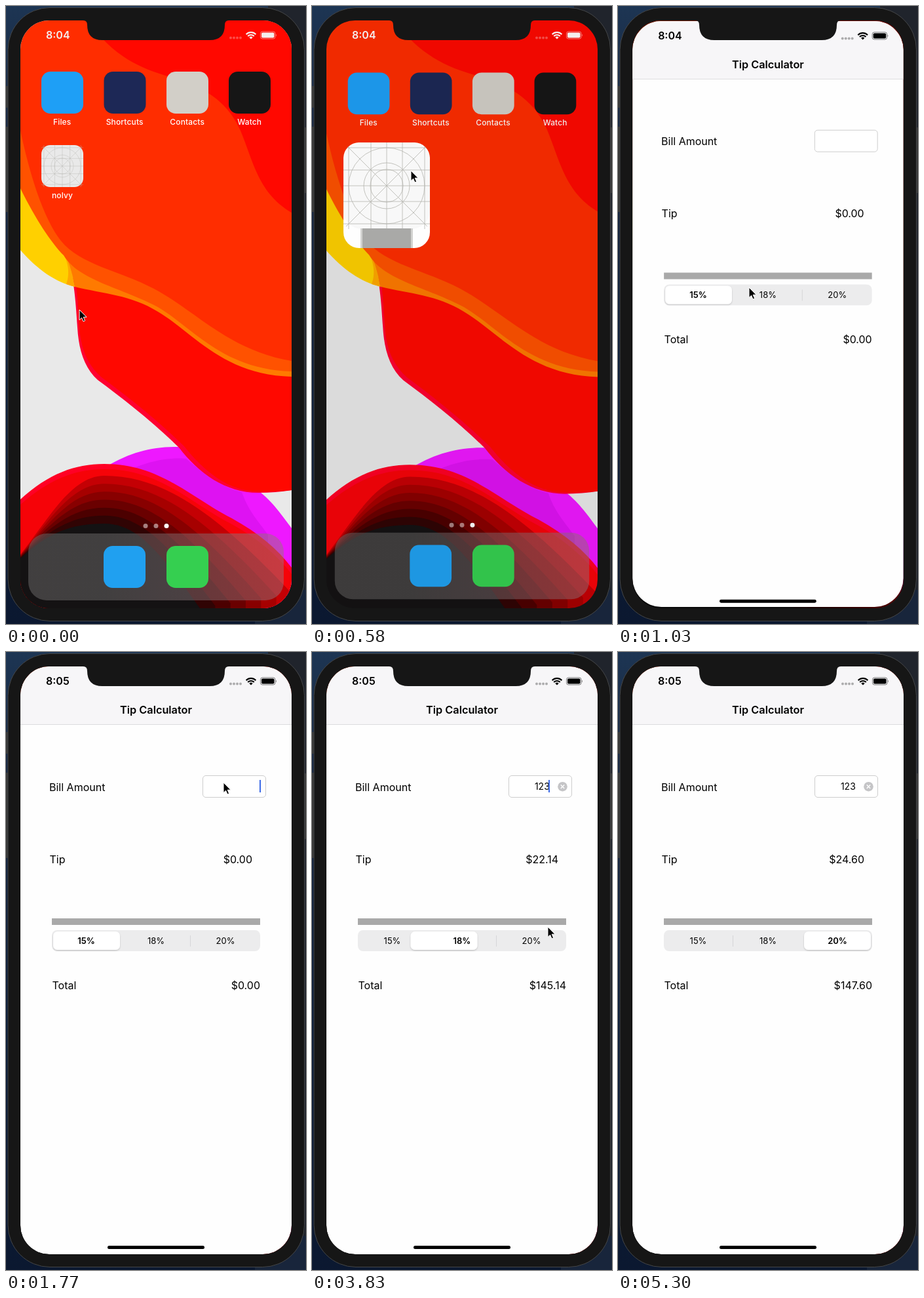
Animation of 458 by 942 pixels, one loop 5400 ms. Source, as an HTML page:

```html
<!DOCTYPE html>
<html lang="en">
<head>
<meta charset="utf-8">
<title>Tip Calculator</title>
<style>
  html, body { margin: 0; width: 100%; height: 100%; overflow: hidden; background: #12161f; }
  svg { display: block; width: 458px; height: 942px; }
  text { font-family: Inter, "Liberation Sans", sans-serif; font-size: 16px; }
  .time { font-weight: 600; }
  .label { font-size: 12px; font-weight: 500; fill: #fff; text-anchor: middle; letter-spacing: .15px; }
  .end { text-anchor: end; }
  .seg { font-size: 13px; text-anchor: middle; }
</style>
</head>
<body>
<svg viewBox="0 0 458 942">
  <defs>
    <linearGradient id="desk" x2="0" y2="1">
      <stop offset="0" stop-color="#1d3553"/>
      <stop offset=".2" stop-color="#17263f"/>
      <stop offset=".6" stop-color="#0c1d38"/>
      <stop offset="1" stop-color="#0b1830"/>
    </linearGradient>
    <linearGradient id="dock">
      <stop offset=".3" stop-color="#6e6c6c"/>
      <stop offset="1" stop-color="#98727a"/>
    </linearGradient>
    <clipPath id="screen"><rect x="22" y="22" width="414" height="896" rx="44"/></clipPath>
    <clipPath id="cardClip"><rect id="cardBox"/></clipPath>
    <filter id="soft" x="-10%" y="-10%" width="120%" height="120%"><feGaussianBlur id="softBlur"/></filter>
    <filter id="lift" x="-10%" y="-20%" width="120%" height="150%">
      <feDropShadow dx="0" dy="1.2" stdDeviation="1.2" flood-opacity=".2"/>
    </filter>
    <g id="status">
      <g fill="currentColor" opacity=".3">
        <circle cx="343" cy="48.5" r="2"/><circle cx="348" cy="48.5" r="2"/>
        <circle cx="353" cy="48.5" r="2"/><circle cx="358" cy="48.5" r="2"/>
      </g>
      <path d="M366.6 43.2a10.5 10.5 0 0 1 14.8 0M369.2 46a6.8 6.8 0 0 1 9.6 0" fill="none" stroke="currentColor" stroke-width="2.2"/>
      <path d="M374 50.6l-2.6-2.7a3.7 3.7 0 0 1 5.2 0Z" fill="currentColor"/>
      <rect x="388.5" y="39" width="22.5" height="11" rx="3" fill="none" stroke="currentColor" opacity=".5"/>
      <rect x="390" y="40.5" width="19.5" height="8" rx="1.8" fill="currentColor"/>
      <path d="M412 42.8q1.8 1.6 0 3.6Z" fill="currentColor" opacity=".5"/>
    </g>
    <g id="grid">
      <rect width="132" height="132" rx="28"/>
      <g fill="none" stroke="#b4b4ae" stroke-width=".8">
        <path d="M8 0V132M42 0V132M66 0V132M90 0V132M124 0V132M0 8H132M0 42H132M0 66H132M0 90H132M0 124H132M4 4L128 128M128 4L4 128"/>
        <circle cx="66" cy="66" r="58"/><circle cx="66" cy="66" r="35"/><circle cx="66" cy="66" r="25"/>
      </g>
    </g>
  </defs>

  <!-- desktop and phone body -->
  <rect width="458" height="942" fill="url(#desk)"/>
  <rect x="400" width="58" height="942" fill="#20242c"/>
  <path d="M0 122h6v33h-6ZM0 184h6v130h-6ZM452 185h6v100h-6Z" fill="#373737"/>
  <path d="M380 890h78v52h-78Z" fill="#18253b"/>
  <rect x="3" y="2.5" width="452.5" height="935" rx="64" fill="#161616" stroke="#444648"/>

  <g clip-path="url(#screen)">
    <rect x="22" y="22" width="414" height="896" fill="#111"/>
    <g id="wall">
      <rect x="22" y="22" width="414" height="896" fill="#e9e9e9"/>
      <path d="M155 701C190 680 225 671 265 672L380 735C405 752 420 775 436 796V918H155Z" fill="#ee18ff"/>
      <path d="M195 704C225 692 250 688 275 690C310 720 335 735 360 741C370 770 385 785 400 806V918H195Z" fill="#de12f2"/>
      <path d="M88 360C104 410 106 445 109 490C111 525 120 552 140 570C178 598 222 632 264 673C294 712 335 742 385 742Q412 742 436 738V300H88Z" fill="#ff0030"/>
      <path d="M94 360C108 410 109 445 112 490C114 522 125 548 146 566C184 594 230 630 272 671C302 709 340 740 385 740Q412 741 436 738V300H94Z" fill="#ff0800"/>
      <path d="M22 270V372C48 402 76 421 105 428L92 380C66 350 42 315 22 270Z" fill="#ffd000"/>
      <path d="M84 365C95 390 102 410 105 428C150 439 190 440 232 466C285 497 330 562 436 565V400Z" fill="#ff7a00"/>
      <path d="M84 365Q100 395 105 428L92 424C99 405 94 385 80 362Z" fill="#ffa800"/>
      <path d="M22 160V278C45 325 70 362 88 380C110 418 178 430 232 459C285 490 330 554 436 557V300Z" fill="#ff5200"/>
      <path d="M22 22V190C40 275 62 330 84 358C112 394 175 404 226 431C290 465 340 525 436 541V22Z" fill="#ff2d00"/>
      <path d="M124 22C165 78 205 95 250 108C310 125 340 150 358 190C378 238 385 285 436 315V22Z" fill="#ff0800"/>
      <path d="M22 752C65 713 105 698 150 698C235 698 280 748 345 781C385 803 415 828 436 856V918H22Z" fill="#ff0024"/>
      <path d="M22 760C65 722 105 706 150 706C235 706 280 757 345 790C385 812 415 838 436 866V918H22Z" fill="#f60308"/>
      <g id="arcs"></g>
    </g>
    <g id="icons">
      <rect x="34" y="804" width="390" height="102" rx="28" fill="url(#dock)" fill-opacity=".5"/>
      <circle cx="213" cy="792.5" r="3.5" fill="#fff" opacity=".5"/>
      <circle cx="229" cy="792.5" r="3.5" fill="#fff" opacity=".5"/>
      <circle cx="245" cy="792.5" r="3.5" fill="#fff"/>
      <g id="tiles"></g>
      <g id="homeIcon">
        <use href="#grid" transform="translate(54 212) scale(.485)" fill="#e9e9e9"/>
        <text class="label" x="86" y="293">nolvy</text>
      </g>
    </g>
    <rect id="dim" x="22" y="22" width="414" height="896"/>
    <g id="homeStatus" color="#f4eeee">
      <text class="time" x="61" y="50.3" fill="currentColor">8:04</text>
      <use href="#status"/>
    </g>

    <g id="card" clip-path="url(#cardClip)">
      <rect id="cardFill" x="22" y="22" width="414" height="896" fill="#fefefe"/>
      <g id="launch">
        <use href="#grid" fill="#f8f8f8"/>
        <rect x="26" y="131" width="80" height="31" fill="#d2d2d0"/>
        <rect x="29" y="131" width="74" height="31" fill="#a9a9a7"/>
      </g>
      <g id="app" color="#000">
        <rect id="nav" x="22" y="22" width="414" height="88" fill="#f7f6f8"/>
        <path d="M22 110.5H436" stroke="#dcdcde"/>
        <text class="time" id="clock" x="61" y="50.3"></text>
        <use href="#status"/>
        <text x="229" y="94" text-anchor="middle" style="font-size:16.3px;font-weight:600">Tip Calculator</text>
        <text x="66" y="211.5">Bill Amount</text>
        <rect x="300.5" y="188.5" width="96" height="33" rx="4.5" fill="#fff" stroke="#cdcdcd"/>
        <text class="end" id="bill" x="362.8" y="209.7" style="font-size:14px"></text>
        <rect id="caret" y="195" width="2" height="19" fill="#3c6ae6"/>
        <g id="clear">
          <circle cx="382.5" cy="205.2" r="7.3" fill="#c5c5c7"/>
          <path d="M379.8 202.5l5.4 5.4m0-5.4l-5.4 5.4" stroke="#fff" stroke-width="1.4"/>
        </g>
        <text x="66.5" y="321.7">Tip</text>
        <text class="end" id="tip" x="376" y="321.7"></text>
        <rect x="70" y="406" width="318" height="10" fill="#a9a9a9"/>
        <rect x="70" y="424" width="318" height="32" rx="8" fill="#ececed"/>
        <path id="split1" d="M175.5 432V449" stroke="#d6d6d8"/>
        <path id="split2" d="M281.5 432V449" stroke="#d6d6d8"/>
        <rect id="thumb" y="426" width="102" height="28" rx="6.5" fill="#fff" filter="url(#lift)"/>
        <text class="seg" x="122.5" y="445">15%</text>
        <text class="seg" x="229" y="445">18%</text>
        <text class="seg" x="335" y="445">20%</text>
        <text x="70.5" y="513.7">Total</text>
        <text class="end" id="total" x="388" y="513.7"></text>
        <rect id="bar" x="155" y="905" width="148" height="5" rx="2.5"/>
      </g>
    </g>
  </g>

  <path d="M118 20V22Q124 22 124 29Q124 52 147 52H311Q334 52 334 29Q334 22 340 22V20Z" fill="#161616"/>
  <path id="cursor" d="M0 0V15.5L3.6 12.2L6 17.8L8.6 16.7L6.2 11.2H11Z" fill="#000" stroke="#fff" stroke-width="1"/>
</svg>

<script>
const LOOP = 5400;
const $ = id => document.getElementById(id);
const segs = document.querySelectorAll('.seg');
const show = (id, on) => { $(id).style.display = on ? '' : 'none'; };
const set = (id, attrs) => { for (const k in attrs) $(id).setAttribute(k, attrs[k]); };

// Dark nested waves at the bottom of the wallpaper
['#c40004', '#a60000', '#880000', '#6a0000', '#4c0000', '#300404', '#141213'].forEach((fill, i) => {
  const u = i / 6, top = 716 + 73 * u;
  $('arcs').innerHTML += `<path fill="${fill}" d="M22 ${836 + 6 * u}C65 ${782 + 20 * u} 100 ${top} 150 ${top}` +
    `C${240 - 40 * u} ${top} ${320 - 85 * u} ${772 + 60 * u} ${436 - 140 * u} ${895 + 23 * u}V918H22Z"/>`;
});

// One plain tile per app
[[54, 100, '#1e9ff6', 'Files'], [149.5, 100, '#1d2856', 'Shortcuts'], [245, 100, '#d2cfc8', 'Contacts'],
 [340, 100, '#161616', 'Watch'], [149, 823, '#20a0f0'], [245, 823, '#35cf50']].forEach(([x, y, fill, name]) => {
  $('tiles').innerHTML += `<rect x="${x}" y="${y}" width="64" height="64" rx="14" fill="${fill}"/>` +
    (name ? `<text class="label" x="${x + 31.7}" y="180.5">${name}</text>` : '');
});

// The picture advances in steps of 150 ms, some of them 140 ms
const short = [1, 4, 11, 18, 23, 24, 26, 29, 31, 36];
const steps = [0];
for (let n = 1; n <= 36; n++) steps.push(steps[n - 1] + (short.includes(n) ? 140 : 150));

// Linear track of [time, ...values]
function track(keys, t) {
  let i = 0;
  while (i < keys.length - 2 && t >= keys[i + 1][0]) i++;
  const a = keys[i], b = keys[i + 1];
  const u = Math.min(1, Math.max(0, (t - a[0]) / (b[0] - a[0])));
  return a.slice(1).map((v, j) => v + (b[j + 1] - v) * u);
}

// time, x, y, width, height, radius
const cardKeys = [[440, 54, 212, 64, 64, 14], [580, 48, 208, 132, 161, 24], [730, 26, 65, 373, 758, 42],
  [880, 22.6, 28, 411, 887, 43], [1030, 22.2, 23, 413.4, 893, 44], [1180, 22, 22, 414, 896, 44]];
// time, dim, blur, icon scale, wallpaper scale, status opacity
const homeKeys = [[440, 0, 0, 1, 1, 1], [580, .06, .7, .996, 1.006, 1], [730, .46, 12, .93, 1.05, .2], [880, .6, 14, .9, 1.06, 0]];
const cursorKeys = [[0, 112, 463], [140, 100, 370], [290, 88, 264], [440, 92, 250], [580, 151, 251], [730, 347, 427],
  [880, 280, 437], [1030, 200, 429], [1180, 262, 345], [1330, 330, 240], [1480, 344, 206], [1770, 332, 199],
  [2660, 332, 199], [2960, 180, 370], [3110, 112, 428], [3260, 107, 434], [3540, 222, 436], [3690, 230, 434],
  [3830, 360, 419], [3980, 350, 435], [4270, 346, 438], [4420, 432, 720], [4560, 394, 893]];
const thumbKeys = [[3540, 72], [3690, 84], [3830, 150.5], [3980, 178], [4130, 190], [4270, 262], [4420, 284]];

function caretAlpha(t) {
  if (t < 1770) return 0;
  if (t < 2900) return 1;
  const p = (t - 2680) % 1000;
  return p < 150 || (p >= 450 && p < 600) ? .5 : p < 450 ? 1 : 0;
}

function drawHome(t) {
  const [dim, blur, icons, wall, status] = track(homeKeys, t);
  const about = s => `translate(229 470) scale(${s}) translate(-229 -470)`;
  const filter = blur ? 'url(#soft)' : 'none';
  set('softBlur', { stdDeviation: blur });
  set('wall', { transform: about(wall), filter });
  set('icons', { transform: about(icons), filter });
  set('dim', { opacity: dim });
  set('homeStatus', { opacity: status });
  show('homeIcon', t < 580);
}

function drawCard(t) {
  show('card', t >= 580);
  const [x, y, width, height, rx] = track(cardKeys, t);
  set('cardBox', { x, y, width, height, rx });
  set('launch', { transform: `translate(${x} ${y}) scale(${width / 132})` });
  set('app', { transform: `translate(${x} ${y}) scale(${width / 414}) translate(-22 -22)` });
  show('launch', t < 730);
  show('app', t >= 730);
  show('nav', t >= 880);
  show('bar', t >= 880);
}

function drawApp(t) {
  const typed = '123'.slice(0, t < 2370 ? 0 : t < 2520 ? 1 : t < 2660 ? 2 : 3);
  const pick = t < 3690 ? 0 : t < 4130 ? 1 : 2;
  const tip = typed * [.1, .18, .2][pick];
  const [x] = track(thumbKeys, t);
  $('clock').textContent = t < 1630 ? '8:04' : '8:05';
  $('bill').textContent = typed;
  $('tip').textContent = '$' + tip.toFixed(2);
  $('total').textContent = '$' + (+typed + tip).toFixed(2);
  set('caret', { x: typed ? 361 : 387, opacity: caretAlpha(t) });
  show('clear', typed);
  set('thumb', { x });
  show('split1', x > 250);
  show('split2', x < 170);
  segs.forEach((s, i) => { s.style.fontWeight = i === pick ? 600 : 400; });
}

function draw(t) {
  drawHome(t);
  drawCard(t);
  drawApp(t);
  const [x, y] = track(cursorKeys, t);
  set('cursor', { transform: `translate(${x} ${y})` });
  show('cursor', t < 4700);
}

let last = -1;
function tick() {
  const now = performance.now() % LOOP;
  const t = steps.filter(s => s <= now).pop();
  if (t !== last) draw(last = t);
  requestAnimationFrame(tick);
}
tick();
</script>
</body>
</html>
```
